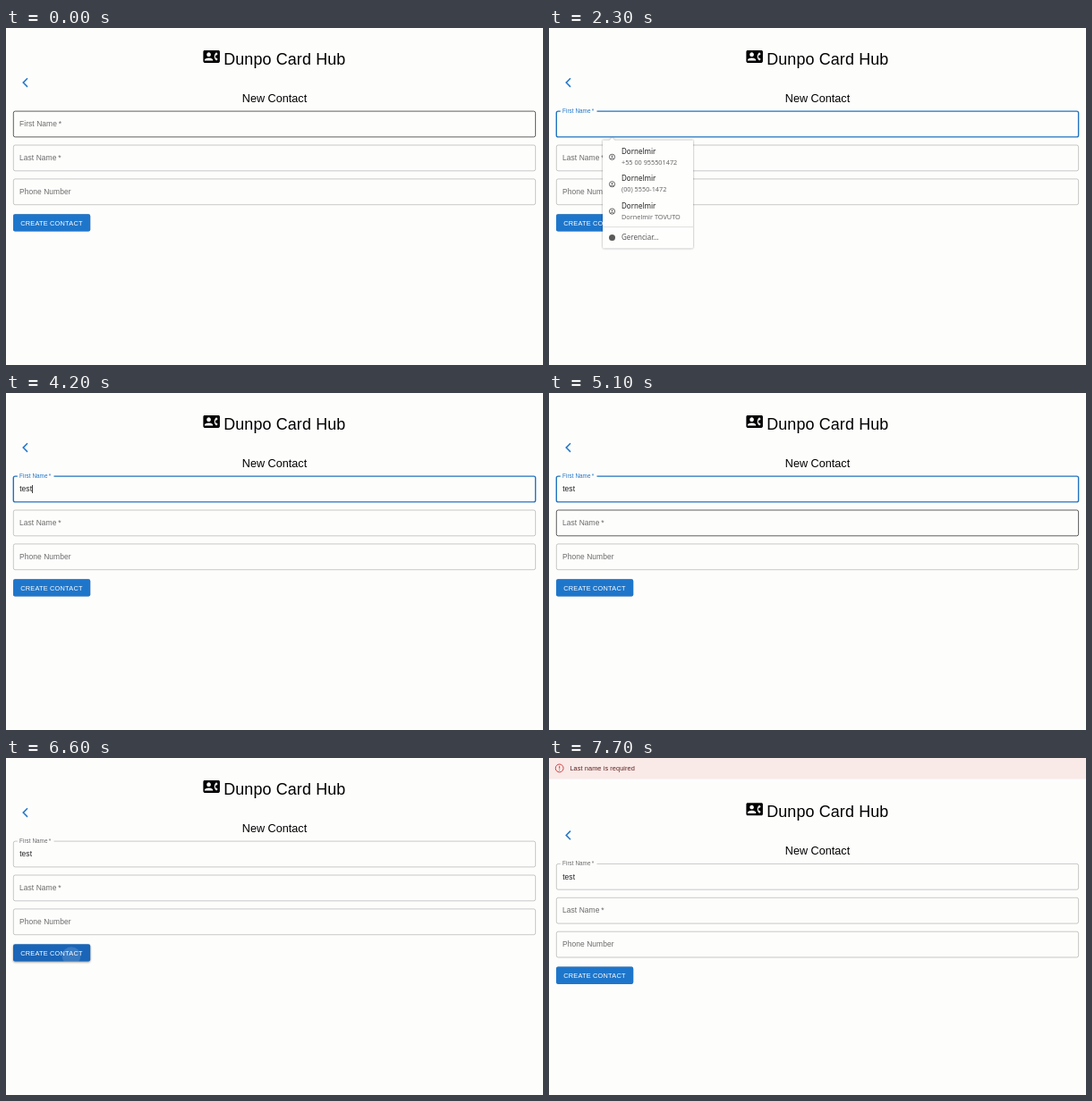
An HTML page that plays this animation: 600x377 px, repeating every 8000 ms.

```html
<!DOCTYPE html>
<html lang="en">
<head>
<meta charset="utf-8">
<title>New Contact</title>
<style>
  html, body { margin: 0; width: 100%; height: 100%; overflow: hidden; background: #fdfdfc; }
  svg { display: block; width: 600px; height: 377px; font-family: "Liberation Sans", Arial, sans-serif; }
  .label, .input { font-size: 8.43px; letter-spacing: .079px; }
  .label { fill: #6a6a6a; }
  .input { fill: #222; }
  .field { fill: none; stroke: rgba(0,0,0,.24); stroke-width: .9; }
  .field.hover { stroke: rgba(0,0,0,.7); }
  .field.focus { stroke: #2173c0; stroke-width: 1.4; }
  .popup { font-family: "Noto Sans", "Open Sans", sans-serif; }
  .popup .box { fill: #fefefd; filter: drop-shadow(0 .6px 1.3px rgba(0,0,0,.4)); }
  .name { font-size: 8px; fill: #222; }
  .info { font-size: 7.3px; fill: #666; }
</style>
</head>
<body>
<svg viewBox="0 0 600 377">
  <defs>
    <clipPath id="buttonClip"><rect x="8" y="208.3" width="86.2" height="19.3" rx="2.1"/></clipPath>
    <g id="person" fill="none" stroke="#555" stroke-width=".9">
      <circle r="3.1"/>
      <circle cy="-.8" r=".9" fill="#555" stroke="none"/>
      <path d="M-2 2.2Q0 .2 2 2.2"/>
    </g>
  </defs>

  <g id="alert">
    <rect width="600" height="23.5" fill="#f9e9e7"/>
    <g fill="none" stroke="#cb4343" stroke-width="1">
      <circle cx="11.7" cy="11.4" r="4.4"/>
      <path d="M11.7 8.9v3M11.7 12.9v1"/>
    </g>
    <text x="23.4" y="14" font-size="7.38" letter-spacing=".079" fill="#5f2120">Last name is required</text>
  </g>

  <g id="page">
    <path transform="translate(220.4 22.7) scale(.772)" d="M22 3H2C.9 3 0 3.9 0 5v14c0 1.1.9 2 2 2h20c1.1 0 1.99-.9 1.99-2L24 5c0-1.1-.9-2-2-2zM8 6c1.66 0 3 1.34 3 3s-1.34 3-3 3-3-1.34-3-3 1.34-3 3-3zm6 12H2v-1c0-2 4-3.1 6-3.1s6 1.1 6 3.1v1zm3.85-4h1.64L21 16l-1.99 1.99c-1.31-.98-2.28-2.38-2.73-3.99-.18-.64-.28-1.31-.28-2s.1-1.36.28-2c.45-1.62 1.42-3.01 2.73-3.99L21 8l-1.51 2h-1.64c-.22.63-.35 1.3-.35 2s.13 1.37.35 2z"/>
    <text x="243.2" y="41" font-size="17.92" letter-spacing=".13">Dunpo Card Hub</text>
    <path d="M24 56.3L19.2 61.1L24 65.9" fill="none" stroke="#2478c8" stroke-width="1.5"/>
    <text x="300" y="83" font-size="12.65" text-anchor="middle">New Contact</text>

    <rect class="field" id="first" x="8.3" y="93.1" width="583.3" height="28.8" rx="2"/>
    <rect class="field" id="last" x="8.3" y="131" width="583.3" height="28.8" rx="2"/>
    <rect class="field" x="8.3" y="168.9" width="583.3" height="28.8" rx="2"/>
    <rect id="notch" x="12.8" y="91.5" height="3.2" fill="#fdfdfc"/>
    <text class="label" id="firstLabel">First Name&thinsp;*</text>
    <text class="label" x="15" y="147.9">Last Name&thinsp;*</text>
    <text class="label" x="15" y="185.8">Phone Number</text>
    <text class="input" id="typed" x="15.2" y="110.4"></text>
    <rect id="caret" y="103" width=".8" height="9" fill="#111"/>

    <rect id="button" x="8" y="208.3" width="86.2" height="19.3" rx="2.1"/>
    <g clip-path="url(#buttonClip)"><circle id="ripple" cx="73" cy="221.5" fill="#fff"/></g>
    <text x="16.2" y="220.6" font-size="7.38" letter-spacing=".21" fill="#fff">CREATE CONTACT</text>
  </g>

  <g class="popup" id="tooltip">
    <rect x="131.9" y="119.5" width="86" height="12.6" fill="#fefefd" stroke="#666" stroke-width=".9" style="filter:drop-shadow(0 1px 1.3px rgba(0,0,0,.3))"/>
    <text x="135.7" y="128.4" font-size="7.5" fill="#333">Preencha este campo.</text>
  </g>

  <g class="popup" id="menu">
    <path class="box" d="M60 125.5H67.5L70.5 122.8L73.5 125.5H161V245a1.5 1.5 0 0 1-1.5 1.5H61.5a1.5 1.5 0 0 1-1.5-1.5z"/>
    <path d="M60 222.6H161" stroke="#d8d8d8" stroke-width=".8"/>
    <circle cx="70.5" cy="234.5" r="3.5" fill="#5a5a5a"/>
    <text x="81" y="237.4" font-size="8" fill="#5a5a5a">Gerenciar…</text>
  </g>
</svg>
<script>
const LOOP = 8000, STEP = 100;
const $ = id => document.getElementById(id);
const set = (id, attrs) => { for (const k in attrs) $(id).setAttribute(k, attrs[k]); };
const show = (id, on) => set(id, { visibility: on ? 'visible' : 'hidden' });
const mix = (a, b, p) => a + (b - a) * p;
const mixColor = (a, b, p) => `rgb(${a.map((v, i) => mix(v, b[i], p))})`;

// y of a CSS cubic-bezier(x1, y1, x2, y2) at x
function bezier(x1, y1, x2, y2, x) {
  const at = (a, b, u) => 3 * u * (1 - u) ** 2 * a + 3 * u * u * (1 - u) * b + u ** 3;
  let lo = 0, hi = 1;
  for (let i = 0; i < 20; i++) {
    const mid = (lo + hi) / 2;
    if (at(x1, x2, mid) < x) lo = mid; else hi = mid;
  }
  return at(y1, y2, lo);
}
const span = (t, start, length) => Math.min(1, Math.max(0, (t - start) / length));
const easeOut = p => bezier(0, 0, .2, 1, p);
const easeInOut = p => bezier(.4, 0, .2, 1, p);

const contacts = ['+55 00 955501472', '(00) 5550-1472', 'Dornelmir TOVUTO'];
$('menu').innerHTML += contacts.map((info, i) => `<g transform="translate(0 ${30.4 * i})">
  <use href="#person" x="70.5" y="144.3"/>
  <text class="name" x="81" y="140.8">Dornelmir</text>
  <text class="info" x="81" y="153.1">${info}</text></g>`).join('');

const GREY = [106, 106, 106], BLUE = [33, 118, 200];
const BASE = [30, 118, 203], DARK = [26, 101, 183];
const keys = [3700, 3900, 4000, 4200];

function render(t) {
  const focused = t >= 1700 && t < 5600;
  const hovered = t < 100 || (t >= 300 && t < 1700);
  set('first', { class: 'field' + (focused ? ' focus' : hovered ? ' hover' : '') });
  set('last', { class: 'field' + (t >= 5100 && t < 5200 ? ' hover' : '') });

  // floating label
  const lift = easeOut(span(t, 1680, 200));
  const tint = lift * (1 - easeOut(span(t, 5560, 200)));
  set('firstLabel', {
    transform: `translate(15 ${mix(110, 94.8, lift)}) scale(${mix(1, .75, lift)})`,
    style: `fill:${mixColor(GREY, BLUE, tint)}`
  });
  set('notch', { width: 40.7 * easeOut(span(t, 1680, 150)) });

  // typing and a caret that restarts its blink with each key
  const count = keys.filter(k => t >= k).length;
  $('typed').textContent = 'test'.slice(0, count);
  const since = t - (count ? keys[count - 1] : 1700);
  set('caret', { x: 15.1 + (count ? $('typed').getComputedTextLength() : 0) });
  show('caret', focused && since % 1200 < 600);

  set('tooltip', { opacity: t < 1700 ? span(t, 1000, 200) : 0 });
  show('menu', t >= 1800 && t < 3800);

  // button hover and ripple
  const hover = easeInOut(span(t, 5950, 250)) - easeInOut(span(t, 6850, 250));
  set('button', {
    fill: mixColor(BASE, DARK, hover),
    style: `filter:drop-shadow(0 ${mix(.7, 1.2, hover)}px ${mix(.7, 1.2, hover)}px rgba(0,0,0,.4))`
  });
  const grow = easeInOut(span(t, 6480, 550));
  set('ripple', { r: 62 * grow, opacity: mix(.1, .3, grow) * (1 - easeInOut(span(t, 6650, 550))) });

  const failed = t >= 6700;
  show('alert', failed);
  set('page', { transform: `translate(0 ${failed ? 25.3 : 0})` });
}

const begin = performance.now();
function tick() {
  const t = (performance.now() - begin) % LOOP;
  render(Math.floor(t / STEP) * STEP);
  requestAnimationFrame(tick);
}
tick();
</script>
</body>
</html>
```
